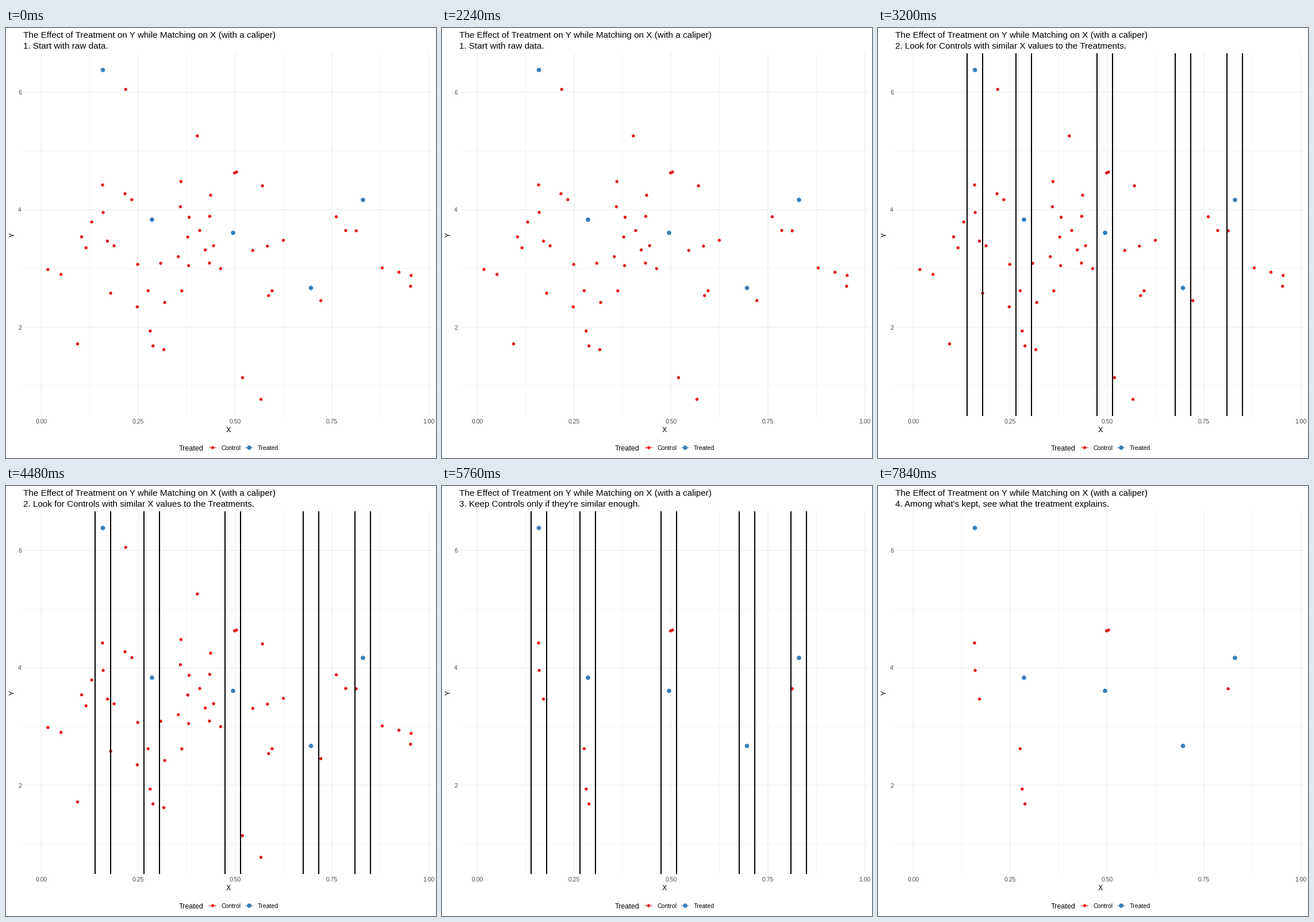
Animation of 748x748 px, one loop 8000 ms. Source, as a matplotlib script:

```python
import numpy as np
import matplotlib.pyplot as plt
from matplotlib.animation import FuncAnimation

SIZE, DPI = 748, 68
PT = 72 / DPI  # points per pixel
FRAMES, INTERVAL = 50, 160
RED, BLUE, GREY, GRID = "#E41A1C", "#377EB8", "#4D4D4D", "#EBEBEB"
LEFT, RIGHT, TOP, BOTTOM = 31, 742.5, 44, 675
CALIPER = 13.5
N_OTHERS = 42

HEADING = "The Effect of Treatment on Y while Matching on X (with a caliper)"
STEPS = [
    "1. Start with raw data.",
    "2. Look for Controls with similar X values to the Treatments.",
    "3. Keep Controls only if they're similar enough.",
    "4. Among what's kept, see what the treatment explains.",
]
TITLE_AT = (17, 32, 48)  # each heading changes one frame ahead of the plot
LINES_ON, DROP_AT, LINES_OFF = 18, 33, 49

# Key points in stage pixels; the remaining controls are a seeded cloud
treated = np.array([(168.5, 73), (254, 333.4), (395, 356.3),
                    (530.5, 452.2), (621, 299)])
matches = [(168, 273), (169, 320.8), (176.5, 370.7), (247.3, 457),
           (250.8, 527.2), (255.6, 553), (397.6, 252), (401, 250.6),
           (609.2, 352.8)]
outliers = [(208.2, 106.8), (332.8, 187.8), (411.4, 608.2), (443.5, 646)]


def gap(xy):
    """Distance along X to the nearest treated point."""
    return np.abs(xy[:, :1] - treated[:, 0]).min(axis=1)


rng = np.random.default_rng(8)
cloud = np.column_stack([rng.uniform(62, 712, 2 * N_OTHERS),
                         rng.normal(405, 85, 2 * N_OTHERS).clip(244, 598)])
cloud = cloud[gap(cloud) > CALIPER][:N_OTHERS]
controls = np.vstack([matches, outliers, cloud])

plt.rcParams["font.family"] = "Liberation Sans"
fig = plt.figure(figsize=(SIZE / DPI, SIZE / DPI), dpi=DPI, facecolor="white")
ax = fig.add_axes([0, 0, 1, 1])
ax.set_xlim(0, SIZE)
ax.set_ylim(SIZE, 0)
ax.axis("off")


def label(x, y, text, size, color="black", **kw):
    return ax.text(x, y, text, fontsize=size * PT, color=color,
                   va="baseline", **kw)


def line(xs, ys, color, width, z=1, snap=False):
    return ax.plot(xs, ys, color=color, lw=width * PT, zorder=z, snap=snap,
                   solid_capstyle="butt")[0]


def dots(xy, color, diameter, z):
    return [ax.add_patch(plt.Circle(p, diameter / 2, fc=color, lw=0, zorder=z))
            for p in xy]


def grid(xs, ys, width):
    for x in xs:
        line([x, x], [TOP, BOTTOM], GRID, width)
    for y in ys:
        line([LEFT, RIGHT], [y, y], GRID, width)


x_ticks = 61.2 + 168.6 * np.arange(5)
y_ticks = 112 + 204.2 * np.arange(3)
grid(x_ticks[:-1] + 84.3, y_ticks + 102.1, 0.55)
grid(x_ticks, y_ticks, 1.07)

for i, x in enumerate(x_ticks):
    label(x, 688.5, f"{i / 4:.2f}", 10.5, GREY, ha="center")
for value, y in zip((6, 4, 2), y_ticks):
    label(27, y + 4.2, str(value), 10.5, GREY, ha="right")
label(387.3, 703, "X", 12.5, ha="center")
label(14.5, 360, "Y", 12.5, ha="center", rotation=90, rotation_mode="anchor")

label(301, 735, "Treated", 12.5)
for x, name, color, size in ((359.5, "Control", RED, 5.4),
                             (423, "Treated", BLUE, 7.6)):
    line([x - 6.5, x + 6.5], [730, 730], color, 1.07)
    dots([(x, 730)], color, size, 3)
    label(x + 14.7, 734, name, 10.5)

label(30.5, 17, HEADING, 15.2)
subtitle = label(30.5, 35.5, STEPS[0], 15.2)
points = dots(controls, RED, 5.4, 2)
dots(treated, BLUE, 7.6, 3)
unmatched = [p for p, g in zip(points, gap(controls)) if g > CALIPER]
bounds = [line([x + side, x + side], [TOP, BOTTOM], "black", 2, 4, True)
          for x in treated[:, 0] for side in (-CALIPER, CALIPER)]


def update(i):
    subtitle.set_text(STEPS[sum(i >= t for t in TITLE_AT)])
    for p in unmatched:
        p.set_visible(i < DROP_AT)
    for b in bounds:
        b.set_visible(LINES_ON <= i < LINES_OFF)
    return [subtitle, *unmatched, *bounds]


anim = FuncAnimation(fig, update, frames=FRAMES, interval=INTERVAL,
                     init_func=lambda: update(0), repeat=True, repeat_delay=0)
plt.show()
```
